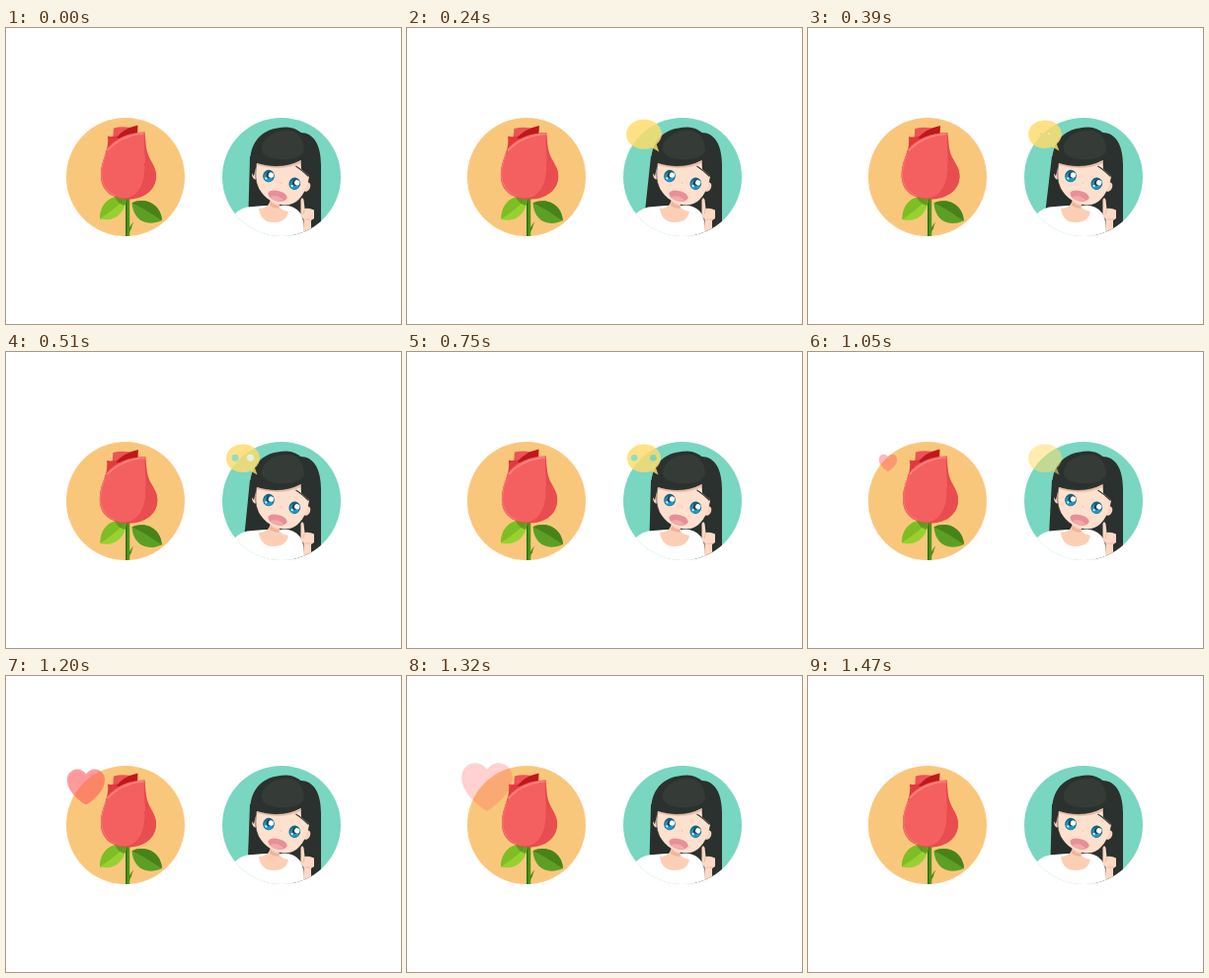
An HTML page that plays this animation: 400x300 px, repeating every 1500 ms.

```html
<!DOCTYPE html>
<html lang="en">
<head>
<meta charset="utf-8">
<title>Rose and girl</title>
<style>
html, body { margin: 0; width: 100%; height: 100%; overflow: hidden; background: #fff; }
svg { display: block; width: 100vw; height: 100vh; }
</style>
</head>
<body>
<svg viewBox="0 0 400 300">
  <defs>
    <clipPath id="disc"><circle cx="279" cy="151" r="60"/></clipPath>
    <clipPath id="ground"><circle cx="121" cy="151" r="60"/></clipPath>
  </defs>

  <circle cx="121" cy="151" r="60" fill="#f9c77c"/>
  <g clip-path="url(#ground)">
    <path d="M121 170h2.2v42H121z" fill="#2e7d14"/>
    <path d="M123.2 170h2v42h-2z" fill="#498f0d"/>
    <path d="M124.5 206Q125 200 129.500 196.500Q127 200 127 203.500Q125.500 204 125 208z" fill="#438a10"/>
  </g>
  <g id="leafL">
    <path d="M122 171C107 168 95 177 95 193.500C109 197 121 189 122 171z" fill="#98d032"/>
    <path d="M122 171C107 168 95 177 95 193.500C104 187 114 181 122 171z" fill="#7fbd25"/>
    <path d="M110 171Q117 169 122 171Q122 176 120 180Q113 178 110 171z" fill="#568f1b" opacity=".75"/>
  </g>
  <g id="leafR">
    <path d="M127.500 177.500C140 171 157 178 158 195C142 202 129 195 127.500 177.500z" fill="#5c9f24"/>
    <path d="M127.500 177.500C140 171 157 178 158 195C148 189 139 182 127.500 177.500z" fill="#488319"/>
  </g>
  <g id="bud">
    <path d="M109 101.500Q119 99 131 102L127 114L108 116z" fill="#ee5355"/>
    <path d="M103 109.500Q109 111 116 108L126 111L101 127Q104 118 103 109.500z" fill="#e3393d"/>
    <path d="M112 111.500Q118 102 133.500 98.500L133 108L119 113z" fill="#c0171b"/>
    <path d="M140.500 105.500C142 118 141 123 146 133C149 139 152 143 152 150C152 164 140 173.500 124 173.500C106 173.500 96 164 96 149C96 138 100 131 102 123C111 111 125 106 140.500 105.500z" fill="#e64a4d"/>
    <path d="M140.500 105.500C138 120 143 132 140 149C138 163 131 172 120 172.500C105 172 96 163 96 149C96 138 100 131 102 123C111 111 125 106 140.500 105.500z" fill="#f4605f"/>
    <path d="M103 124Q116 109 139.500 106.800" fill="none" stroke="#f98581" stroke-width="1.600"/>
    <path d="M146 133C149 139 152 143 152 150C152 164 140 173 124 173C136 168 143 156 140 137z" fill="#ea4d50"/>
    <path d="M101 128C98 136 96.700 142 96.700 149C97 160 104 168 111 170" fill="none" stroke="#f57b77"/>
  </g>

  <circle cx="279" cy="151" r="60" fill="#79d6c1"/>
  <g clip-path="url(#disc)">
    <path id="hair" fill="#292f2c"/>
    <path d="M298 106C312 106 319 119 319 139L319 214H289L290 165L300 140z" fill="#2b312e"/>
    <path d="M230 190Q238 181 250 181L262 180H286Q299 183 301 196L303 214H225z" fill="#fff"/>
    <path d="M268 172L277 178Q275 184 286 186Q284 197 271 197Q258 197 256 183Q267 183 268 172z" fill="#fccfb5"/>
    <path d="M268 176Q272 180 277 180L276 183Q271 183 267 180z" fill="#efb39c"/>
    <ellipse cx="252" cy="148" rx="3" ry="5.500" fill="#fbd3bd" transform="rotate(-8 252 148)"/>
    <ellipse cx="304.500" cy="161" rx="3.500" ry="5" fill="#fbd3bd" transform="rotate(25 304.500 161)"/>
    <path d="M254 132C251 147 252 158 259 167C266 176 277 181 287 179C297 177 304 166 307 151L300 126z" fill="#fee0ce"/>
    <path d="M247 138C247 117 257 101 284 100.500C298 101 308 112 309 130L308 151L299 143L298.500 134Q279 145 254 137L251 150Q247 146 247 138z" fill="#2b312e"/>
    <path d="M259 120C262 109 273 103 287 104C297 105 302 114 302 125Q298 132 286 133C272 134 257 131 259 120z" fill="#353b36"/>
    <path d="M254 137Q278 144 299 134L298.500 137Q279 146 254 139z" fill="#d5a995" opacity=".6"/>
    <path d="M293.500 140Q300 144 306.500 150.500" fill="none" stroke="#393b37" stroke-width="1.200"/>
    <path d="M253.500 139Q251.500 152 255 161" fill="none" stroke="#4b403b" stroke-width=".7"/>
    <g id="eyes"></g>
    <g transform="rotate(14 275 170)">
      <path d="M265 170Q266 165 275 165Q284 165 285 170Q283 175.500 275 175.500Q267 175.500 265 170z" fill="#e78f98"/>
      <path d="M268 173Q275 168 282 173Q279 175.500 275 175.500Q271 175.500 268 173z" fill="#f3a9ab"/>
    </g>
    <path d="M278 156l1 2" stroke="#f3bfa9" stroke-width="1"/>
    <path d="M298.500 174Q300 170.500 301.500 174L302.500 183Q307 182 312 184.500L312 193L309 195V212H301L301.500 194L298.500 190z" fill="#fdd8c4"/>
    <path d="M302.500 183L301 189M303 194H310" fill="none" stroke="#edb59e" stroke-width=".8"/>
  </g>

  <g id="bubble">
    <path d="M240 93.500C249.500 93.500 257 99.500 257 107.500C257 111.500 255 115 252 117.500L254.500 124.500L247.500 120.500Q244 122 240 122C230.500 122 223 116 223 107.700C223 99.500 230.500 93.500 240 93.500z" fill="#fddc6c"/>
    <circle id="dotL" cy="107.300" fill="#79d6c1"/>
    <circle id="dotR" cy="107.300"/>
  </g>
  <path id="heart" d="M0 18C-7 14 -19 4 -19 -7C-19 -14 -14 -18 -9 -18C-5 -18 -2 -16 0 -13C2 -16 5 -18 9 -18C14 -18 19 -14 19 -7C19 4 7 14 0 18z" fill="#ff5c5c"/>
</svg>
<script>
const LOOP = 1500;
const $ = id => document.getElementById(id);
const set = (id, attrs) => { for (const k in attrs) $(id).setAttribute(k, attrs[k]); };
const mix = (a, b, p) => a + (b - a) * p;

// Piecewise linear value through [time, value] points
function track(t, points) {
  for (let i = 1; i < points.length; i++) {
    const [t0, a] = points[i - 1], [t1, b] = points[i];
    if (t <= t1) return mix(a, b, Math.max(0, (t - t0) / (t1 - t0)));
  }
  return points[points.length - 1][1];
}

const bump = (t, from, to) => t > from && t < to ? Math.sin(Math.PI * (t - from) / (to - from)) : 0;
const scaleAt = (x, y, sx, sy) => `translate(${x} ${y}) scale(${sx} ${sy}) translate(${-x} ${-y})`;

const eye = (x, y) => `<g transform="translate(${x} ${y}) rotate(14)">
  <ellipse rx="5.800" ry="6.200" fill="#17617f"/>
  <ellipse cy="1" rx="4.800" ry="4.900" fill="#2495c4"/>
  <ellipse cy="-1" rx="2.800" ry="3.200" fill="#124a63"/>
  <circle cx="2.200" cy="-1.500" r="2.700" fill="#fff"/>
  <circle cx="-2" cy="3" r="1.100" fill="#d9f3fb"/></g>`;
$("eyes").innerHTML = eye(266, 150) + eye(292.3, 157.7);

function draw(t) {
  const swell = bump(t, 0, 770);
  set("bud", { transform: scaleAt(123, 172, 1 + swell * .05, 1 - swell * .007) });
  set("leafL", { transform: `rotate(${-swell * 1.5} 122 172)` });
  set("leafR", { transform: `rotate(${swell * .8} 127 178)` });

  const sway = 5.2 * bump(t, 0, 720) + 1.5 * bump(t, 850, 1250);
  set("hair", { d: `M247 130L${245.5 - sway} 186H296L300 130z` });

  const size = track(t, [[40, 0], [200, 1.07], [250, 1.05], [340, .98], [420, 1], [1500, 1]]);
  const fade = track(t, [[40, 0], [200, .83], [960, .83], [1050, .55], [1150, 0]]);
  set("bubble", { transform: scaleAt(239.5, 108, size, size), opacity: fade });

  const gap = track(t, [[360, 3], [510, 7.7], [750, 9.6], [900, 9.6]]);
  const r = track(t, [[360, 0], [480, 3.5], [750, 3.3], [900, 3], [1000, 0]]);
  const white = track(t, [[510, 1], [720, 0]]);
  set("dotL", { cx: 239.8 - gap, r });
  set("dotR", { cx: 239.8 + gap, r,
    fill: `rgb(${mix(121, 250, white)},${mix(214, 250, white)},${mix(193, 235, white)})` });

  const grow = track(t, [[985, 0], [1050, .48], [1080, .68], [1140, .9], [1200, 1], [1400, 1.58]]);
  const glow = track(t, [[985, .1], [1050, .43], [1140, .62], [1200, .62], [1420, 0]]);
  set("heart", { transform: `translate(81 112.500) scale(${grow})`, opacity: t < 985 ? 0 : glow });
}

function tick() {
  draw(performance.now() % LOOP);
  requestAnimationFrame(tick);
}
tick();
</script>
</body>
</html>
```
